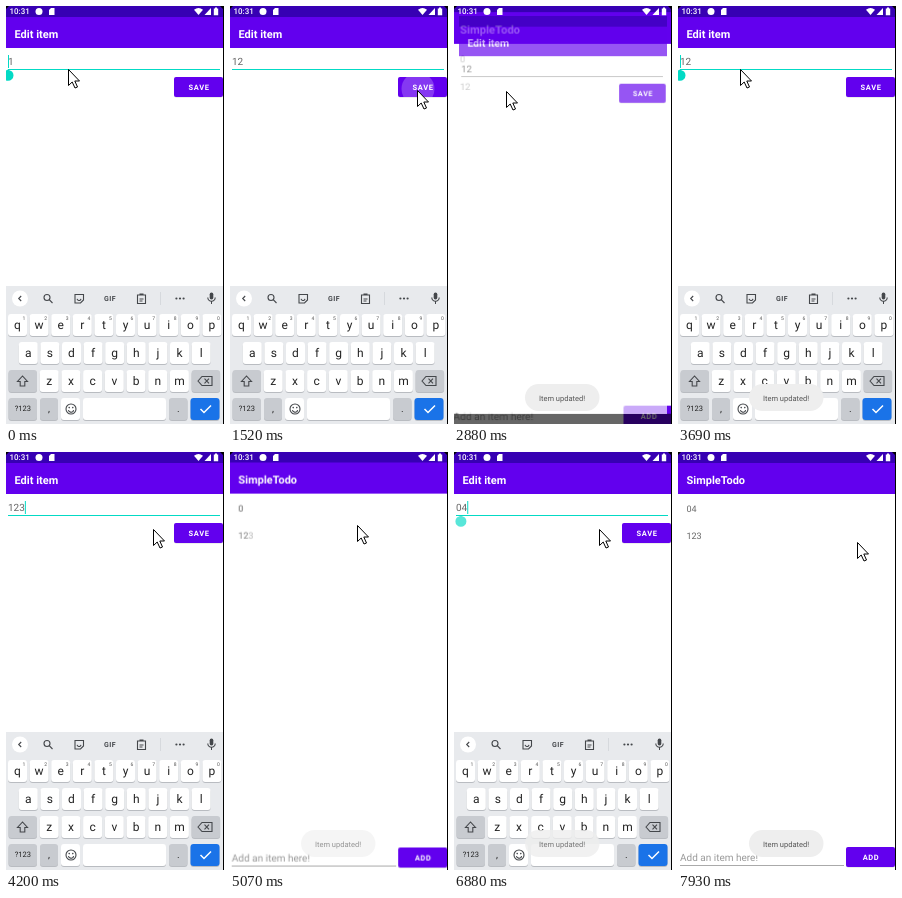
An HTML page with a canvas for the animation above (8000 ms loop, 218 px wide and 418 px high).

```html
<!DOCTYPE html>
<html lang="en">
<head>
<meta charset="utf-8">
<title>Todo list demo</title>
<style>
html, body { margin: 0; width: 100%; height: 100%; overflow: hidden; background: #fff; }
canvas { display: block; width: 218px; height: 418px; }
</style>
</head>
<body>
<canvas id="stage" width="218" height="418"></canvas>
<script>
const W = 218, H = 418, LOOP = 8000;
const PURPLE = '#6200ee', DARK = '#3700b3', TEAL = '#03dac5', INK = '#44474b', GRAY = '#c8cbd0';
const stage = document.getElementById('stage').getContext('2d');
const sheet = new OffscreenCanvas(W, H).getContext('2d');
let ctx = stage;

// Each session appends one digit to a row; `end` is when the caret lands after the text.
const edits = [
  { row: 1, to: '12', open: -2000, end: 300, type: 600, close: 1700 },
  { row: 1, to: '123', open: 2780, end: 3740, type: 3900, close: 4740 },
  { row: 0, to: '04', open: 5640, end: 6350, type: 6780, close: 7480 }
];
const before = e => e.to.slice(0, -1);

const ramp = (t, start, length) => Math.min(1, Math.max(0, (t - start) / length));
const easeOut = p => 1 - (1 - p) ** 2;
const smooth = p => p * p * (3 - 2 * p);

function rect(x, y, w, h, color, radius = 0) {
  ctx.fillStyle = color;
  ctx.beginPath();
  ctx.roundRect(x, y, w, h, radius);
  ctx.fill();
}

function disc(x, y, r, color) {
  ctx.fillStyle = color;
  ctx.beginPath();
  ctx.arc(x, y, r, 0, 7);
  ctx.fill();
}

function ring(x, y, r, from = 0, to = 7) {
  ctx.strokeStyle = INK;
  ctx.beginPath();
  ctx.arc(x, y, r, from, to);
  ctx.stroke();
}

// SVG path data placed at x, y
function shape(x, y, data, fill, stroke) {
  ctx.save();
  ctx.translate(x, y);
  const path = new Path2D(data);
  if (fill) { ctx.fillStyle = fill; ctx.fill(path); }
  if (stroke) { ctx.strokeStyle = stroke; ctx.stroke(path); }
  ctx.restore();
}

function text(str, x, y, size, color, { weight = 400, align = 'left', spacing = 0 } = {}) {
  ctx.font = `${weight} ${size}px Roboto, sans-serif`;
  ctx.textRendering = 'geometricPrecision';
  ctx.letterSpacing = spacing + 'px';
  ctx.textAlign = align;
  ctx.fillStyle = color;
  ctx.fillText(str, x, y);
  return ctx.measureText(str).width;
}

function faded(alpha, draw) {
  ctx.save();
  ctx.globalAlpha *= alpha;
  draw();
  ctx.restore();
}

// Draws a whole screen as one sheet, scaled about the centre.
function screen(alpha, scale, draw) {
  ctx = sheet;
  ctx.clearRect(0, 0, W, H);
  draw();
  ctx = stage;
  faded(alpha, () => {
    const w = W * scale, h = H * scale;
    ctx.drawImage(sheet.canvas, (W - w) / 2, (H - h) / 2, w, h);
  });
}

function button(label, y) {
  rect(168, y + 0.5, 49, 20, 'rgba(0,0,0,.15)', 2);
  rect(168, y, 49, 20, PURPLE, 2);
  text(label, 193, y + 13, 7.5, '#fff', { weight: 700, align: 'center', spacing: 0.6 });
}

function page(title) {
  rect(0, 0, W, H, '#fff');
  rect(0, 0, W, 42, PURPLE);
  rect(0, 0, W, 11, DARK);
  text(title, 8.5, 32, 11, '#fff', { weight: 700 });
}

function listPage(t) {
  page('SimpleTodo');
  ['0', '1'].forEach((initial, row) => {
    const y = 60 + row * 26.5;
    const last = edits.filter(e => e.row === row && e.close < t).pop();
    const p = last ? ramp(t, last.close + 210, 250) : 0;
    faded(1 - p, () => text(last ? before(last) : initial, 8.5, y, 9, '#666'));
    if (last) faded(p, () => text(last.to, 8.5, y, 9, '#666'));
  });
  text('Add an item here!', 2, 409, 10, '#999');
  rect(2, 413, 164, 1, '#aaa');
  button('ADD', 395);
}

function editPage(e, t) {
  page('Edit item');
  const focused = t > e.open + 300, typed = t > e.type;
  const width = text(typed ? e.to : before(e), 2, 59, 10, '#666');
  const caret = t < e.end ? 2 : 2 + width;
  rect(2, 63, 212, 1, focused ? TEAL : '#aaa');
  if (focused && (!typed || (t - e.type) % 1000 < 500)) rect(caret, 49, 1, 13, TEAL);

  button('SAVE', 71);
  const press = ramp(t, e.close - 260, 300);
  if (press > 0) {
    ctx.save();
    ctx.beginPath();
    ctx.rect(168, 71, 49, 20);
    ctx.clip();
    disc(188, 83, 10 + 24 * press, 'rgba(255,255,255,.22)');
    ctx.restore();
  }
  if (t > e.end - 350) {
    const x = t < e.end ? 2 : 2 + ctx.measureText(before(e)).width;
    faded(1 - ramp(t, e.type, 300), () => shape(x, 63.5, 'M0 0L4 2A5.5 5.5 0 1 1-4 2Z', TEAL));
  }
}

// Lays keys of [label, width, color, size] from left to right.
function keyRow(x, y, gap, keys) {
  for (const [label, w, color = '#fff', size = 12] of keys) {
    rect(x, y + 1, w, 22, '#b9bcc1', 3);
    rect(x, y, w, 22, color, 3);
    text(label, x + w / 2, y + 11 + size * 0.33, size, '#222', { align: 'center' });
    x += w + gap;
  }
}

function toolbar() {
  disc(14, 292.5, 8, '#fff');
  shape(12.7, 292.5, 'M2.5-2.5L0 0l2.5 2.5', null, INK);
  ring(41, 291.5, 3);
  shape(43.2, 293.7, 'M0 0l3.3 3.3', null, INK);
  shape(69, 288.5, 'M0 0h8.5v5.5l-3 3H0z', null, INK);
  ring(73, 292.5, 2, 0.2, 2.9);
  text('GIF', 104, 295.3, 7, INK, { weight: 700, align: 'center', spacing: 0.4 });
  shape(131.5, 289, 'M0 0h8v8.5h-8zM2-1h4M2 4h4M2 6h3', null, INK);
  rect(154, 286, 1, 13, '#d6d9dd');
  for (let i = -1; i < 2; i++) disc(174 + i * 3.6, 292.5, 1.1, INK);
  rect(203.7, 286.5, 3.6, 7, INK, 1.8);
  ring(205.5, 291.5, 3.7, 0, Math.PI);
  rect(205, 295, 1, 3, INK);
}

function keyboard() {
  rect(0, 280, W, 140, '#e8eaed');
  ctx.lineWidth = 1.1;
  toolbar();

  const letters = str => [...str].map(c => [c, 19]);
  const wide = [['', 28.5, GRAY]];
  keyRow(2, 308, 2.6, letters('qwertyuiop'));
  keyRow(12.8, 336, 2.6, letters('asdfghjkl'));
  keyRow(2.5, 364, 2.7, [...wide, ...letters('zxcvbnm'), ...wide]);
  keyRow(2.5, 392, 3, [
    ['?123', 28.5, GRAY, 7.5], [',', 18, GRAY, 10], ['', 19], ['', 83],
    ['.', 18.5, GRAY, 10], ['', 29, '#1a73e8']
  ]);
  for (let i = 0; i < 10; i++) {
    text((i + 1) % 10, 18 + i * 21.6, 314, 5, '#555', { align: 'center' });
  }

  shape(16.5, 370, 'M0 0l-5 5.5h2.7V10h4.6V5.5H5z', null, INK);
  shape(192, 375, 'M0 0l4-4.5h10v9H4zM6.5-2.3l4.5 4.6m0-4.6l-4.5 4.6', null, INK);
  ring(65, 403, 5);
  ring(65, 403.5, 2.7, 0.2, 2.9);
  for (const side of [-1, 1]) disc(65 + side * 1.8, 401.6, 0.8, INK);
  ctx.lineWidth = 1.5;
  shape(194.5, 403, 'M0 0l3.5 3.5 7-7', null, '#fff');
  ctx.lineWidth = 1;
}

function statusBar() {
  text('10:31', 3.5, 8.3, 8, '#fff', { weight: 500 });
  disc(33, 5.5, 3.5, '#fff');
  shape(43, 2, 'M0 2l2-2h3.5v7H0z', '#fff');
  shape(192.5, 9, 'M0 0l-4.5-5.2q4.5-3.6 9 0z', '#fff');
  shape(198.5, 9, 'M0 0h6.5v-7z', '#fff');
  shape(207.8, 2.5, 'M0 0h1.2v-1h2v1h1.2v6.7H0z', '#fff');
}

function toast(t) {
  for (const e of edits) {
    const age = t - e.close - 210;
    faded(ramp(age, 0, 200) * (1 - ramp(age, 1890, 200)), () => {
      rect(71, 378, 74.5, 27, '#eee', 13.5);
      text('Item updated!', 108, 394.5, 7.5, '#555', { align: 'center' });
    });
  }
}

// The pointer visits the row, the field and the save button of each session in turn.
const stops = edits.flatMap(e => [
  { arrive: e.open - 180, leave: e.open, x: 51, y: 60 + e.row * 26.5 },
  { arrive: e.end - 350, leave: e.end, x: 62, y: 63 },
  { arrive: e.close - 260, leave: e.close, x: 187, y: 84 }
]);
stops.push({ arrive: LOOP, leave: LOOP, x: 179, y: 90 });

function pointer(t) {
  const next = stops.findIndex(s => s.leave > t);
  const a = stops[next - 1], b = stops[next];
  const p = smooth(ramp(t, a.leave, b.arrive - a.leave));
  const at = axis => Math.round(a[axis] + (b[axis] - a[axis]) * p) + 0.5;
  shape(at('x'), at('y'), 'M0 0v16l3.7-3.5 2.8 6 2.5-1-2.7-6H11z', '#fff', '#000');
}

function draw(t) {
  const e = edits.filter(item => item.open <= t).pop();
  const closing = t >= e.close;
  const opened = ramp(t, e.open, 235);
  const show = closing ? 1 - easeOut(ramp(t, e.close, 450)) : easeOut(opened);
  const fadeOut = 1 - ramp(t, e.close, 220);
  const scale = 0.85 + 0.15 * show;

  screen(1, 1 + 0.037 * show, () => listPage(t));
  if (!closing) rect(0, H / 2 * (1 + scale), W, H, 'rgba(0,0,0,.6)');
  screen(fadeOut * Math.min(1, opened * 1.55), scale, () => editPage(e, t));
  statusBar();

  const raised = easeOut(ramp(t, e.open + 300, 250)) * fadeOut;
  ctx.save();
  ctx.translate(0, 138 * (1 - raised));
  if (raised > 0) keyboard();
  ctx.restore();
  toast(t);
  pointer(t);

  rect(217, 0, 1, H, '#000');
  shape(0, 0, 'M0 0h3L0 3z', '#000');
  shape(217, 0, 'M0 0h-3l3 3z', '#000');
}

const start = performance.now();
function frame() {
  draw((performance.now() - start) % LOOP);
  requestAnimationFrame(frame);
}
frame();
</script>
</body>
</html>
```
